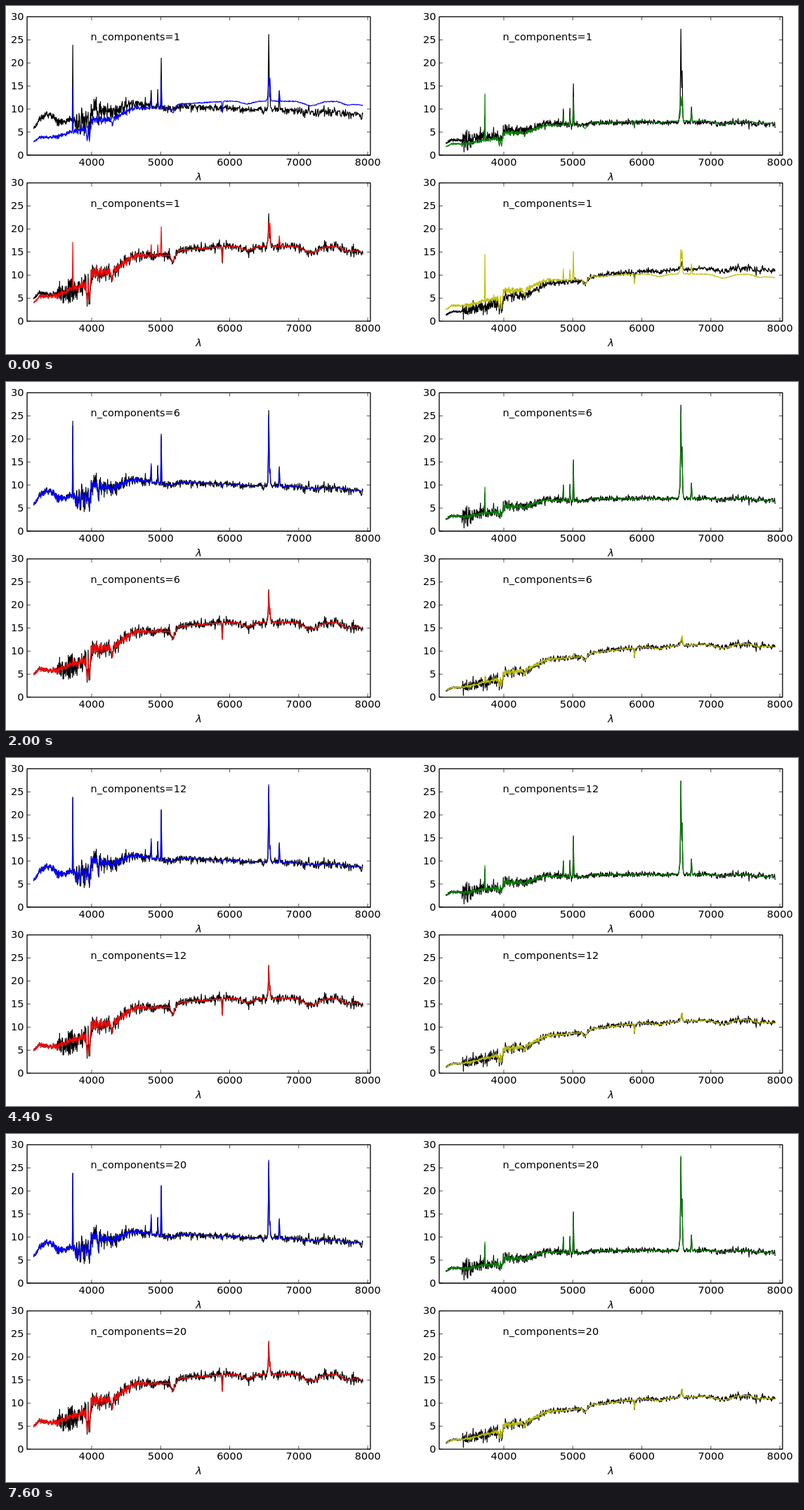
An HTML page with a canvas for the animation above (8000 ms loop, 1128 by 497 pixels).

```html
<!DOCTYPE html>
<html>
<head>
<meta charset="utf-8">
<style>
html, body { margin: 0; width: 100%; height: 100%; overflow: hidden; background: #fff; }
canvas { display: block; }
</style>
</head>
<body>
<canvas id="stage" width="1128" height="497"></canvas>
<script>
const ctx = document.getElementById('stage').getContext('2d');
const WIDTH = 489, HEIGHT = 197.6, SAMPLES = 1000, FIRST = 3160, LAST = 7930;
const STEP_MS = 400, STEPS = 20;
const FONT = '14.5px "DejaVu Sans", sans-serif';

// Wavelengths are spaced logarithmically
const growth = Math.log(LAST / FIRST) / (SAMPLES - 1);
const waves = Array.from({ length: SAMPLES }, (_, i) => FIRST * Math.exp(growth * i));

// Key points [wavelength, flux] of the average spectrum
const TEMPLATE = [[FIRST, 4], [3250, 5.4], [3500, 5.5], [3700, 7], [3988, 8.3], [3998, 10.6], [4300, 10.7],
  [4600, 14.2], [5100, 14.3], [5300, 15.4], [6000, 16.3], [7550, 16.2], [LAST + 1, 15]];
// [wavelength, relative depth, width]
const ABSORPTION = [[3934, .5, 7], [3968, .52, 7], [4302, .17, 10], [5177, .15, 24], [5893, .24, 5],
  [6250, .06, 80], [7180, .09, 100], [7700, .04, 60]];
const BALMER = [6, 7, 8, 9, 10, 11].map(n => 3646 * n * n / (n * n - 4));

const MEAN_LINES = { oii: 10, oiii: 6, ha: 4, nii: 4 };

// gain = [at long waves, extra at short waves, decay length]
const panels = [
  { x: 30, y: 15.4, color: '#00f', scale: .72, gain: [.56, .85, 1100], depth: .3, balmer: .3, hump: 2,
    onset: 3760, noise: 3, lines: { oii: 16, oiii: 10.7, ha: 16, nii: 2.8 } },
  { x: 617, y: 15.4, color: '#008000', scale: .455, gain: [.43, .2, 1000], depth: .35,
    onset: 3390, noise: 2.3, lines: { oii: 5, oiii: 8.5, ha: 17.5, nii: 8.6 } },
  { x: 30, y: 252.6, color: '#f00', scale: 1, gain: [1, .2, 200], depth: 1,
    onset: 3500, noise: 3.5, lines: { oii: 0, oiii: 0, ha: 6.5, nii: 2.2 } },
  { x: 617, y: 252.6, color: '#bfbf00', scale: .63, gain: [.76, -.4, 1900], depth: .8,
    onset: 3400, noise: 2.2, lines: { oii: 0, oiii: 0, ha: .2, nii: 1.4 } }
];

const bell = (d, width) => Math.exp(-d * d / (2 * width * width));
const mix = (a, b, t) => a + (b - a) * t;

function random(seed) {
  const v = Math.sin(seed * 12.9898 + 4.1) * 43758.5453;
  return v - Math.floor(v);
}
function gauss(i, channel) {
  const seed = i * 2 + channel * 4001;
  return Math.sqrt(-2 * Math.log(random(seed) + 1e-9)) * Math.cos(2 * Math.PI * random(seed + 1));
}

function template(wave) {
  const k = TEMPLATE.findIndex(point => point[0] > wave);
  const [x0, y0] = TEMPLATE[k - 1], [x1, y1] = TEMPLATE[k];
  return mix(y0, y1, (wave - x0) / (x1 - x0));
}

function continuum({ gain: [far, near, decay], depth, balmer = 0, hump = 0 }) {
  return waves.map((wave, i) => {
    let flux = template(wave) * (far + near * Math.exp((3200 - wave) / decay)) + hump * bell(wave - 3380, 80);
    for (const [center, amount, width] of ABSORPTION) flux *= 1 - depth * amount * bell(wave - center, width);
    for (const center of BALMER) flux *= 1 - balmer * bell(wave - center, 6);
    return flux * (1 + (.005 + .06 * bell(wave - 3850, 500)) * gauss(i, 0));
  });
}

function emission({ oii, oiii, ha, nii }) {
  const lines = [[3727, oii], [4861, oiii * .4], [4959, oiii / 3], [5007, oiii],
    [6563, ha], [6583, nii], [6720, oiii * .36]];
  const flux = waves.map(wave => .35 * nii * bell(wave - 6568, 18));
  for (const [wave, height] of lines) {
    const center = Math.round(Math.log(wave / FIRST) / growth);
    for (let d = -3; d <= 3; d++) flux[center + d] += height * bell(d, .8);
  }
  return flux;
}

const mean = continuum({ gain: [1, 0, 1], depth: .9 });
const meanLines = emission(MEAN_LINES);

panels.forEach((p, channel) => {
  p.model = continuum(p);
  p.peaks = emission(p.lines);
  p.observed = waves.map((wave, i) => {
    const fade = .28 + .72 * Math.exp((p.onset - wave) / 500) + .15 * bell(wave - 7600, 350);
    const spread = wave < p.onset ? .1 : .45 * p.noise * fade;
    return Math.max(.4, p.model[i] + spread * gauss(i, channel + 1)) + p.peaks[i];
  });
});

// The fit starts at the scaled mean and closes in on the model
function reconstruct(p, n) {
  const shapeError = n ** -1.8, lineError = Math.exp((1 - n) / 2.5);
  return p.model.map((flux, i) =>
    mix(flux, mean[i] * p.scale, shapeError) + mix(p.peaks[i], meanLines[i], lineError));
}

const px = (p, wave) => p.x + 92 + (wave - 4000) * .0983;
const py = (p, flux) => p.y + HEIGHT * (1 - flux / 30);

function plot(p, flux, color) {
  ctx.strokeStyle = color;
  ctx.lineWidth = 1.2;
  ctx.lineJoin = 'round';
  ctx.beginPath();
  flux.forEach((value, i) => ctx.lineTo(px(p, waves[i]), py(p, value)));
  ctx.stroke();
}

function label(text, x, y, align = 'center') {
  ctx.textAlign = align;
  ctx.fillText(text, x, y);
}

function drawAxes(p) {
  const right = p.x + WIDTH, bottom = p.y + HEIGHT;
  ctx.strokeStyle = ctx.fillStyle = '#000';
  ctx.font = FONT;
  ctx.lineWidth = 1.3;
  ctx.strokeRect(p.x, p.y, WIDTH, HEIGHT);
  ctx.lineWidth = .7;
  ctx.beginPath();
  for (let flux = 0; flux <= 30; flux += 5) {
    const y = py(p, flux);
    ctx.moveTo(p.x, y); ctx.lineTo(p.x + 5, y);
    ctx.moveTo(right, y); ctx.lineTo(right - 5, y);
    label(flux, p.x - 4.5, y + 4.5, 'right');
  }
  for (let wave = 4000; wave <= 8000; wave += 1000) {
    const x = px(p, wave);
    ctx.moveTo(x, p.y); ctx.lineTo(x, p.y + 5);
    ctx.moveTo(x, bottom); ctx.lineTo(x, bottom - 5);
    label(wave, x, bottom + 15);
  }
  ctx.stroke();
  ctx.font = 'italic ' + FONT;
  label('λ', p.x + WIDTH / 2, bottom + 35.5);
}

function draw(n) {
  ctx.fillStyle = '#fff';
  ctx.fillRect(0, 0, 1128, 497);
  for (const p of panels) {
    plot(p, p.observed, '#000');
    plot(p, reconstruct(p, n), p.color);
    drawAxes(p);
    ctx.font = FONT;
    label('n_components=' + n, px(p, 4000) - 1.5, py(p, 25) + 1, 'left');
  }
}

let shown = 0;
function tick() {
  const n = Math.floor(performance.now() / STEP_MS) % STEPS + 1;
  if (n !== shown) draw(shown = n);
  requestAnimationFrame(tick);
}
tick();
</script>
</body>
</html>
```
